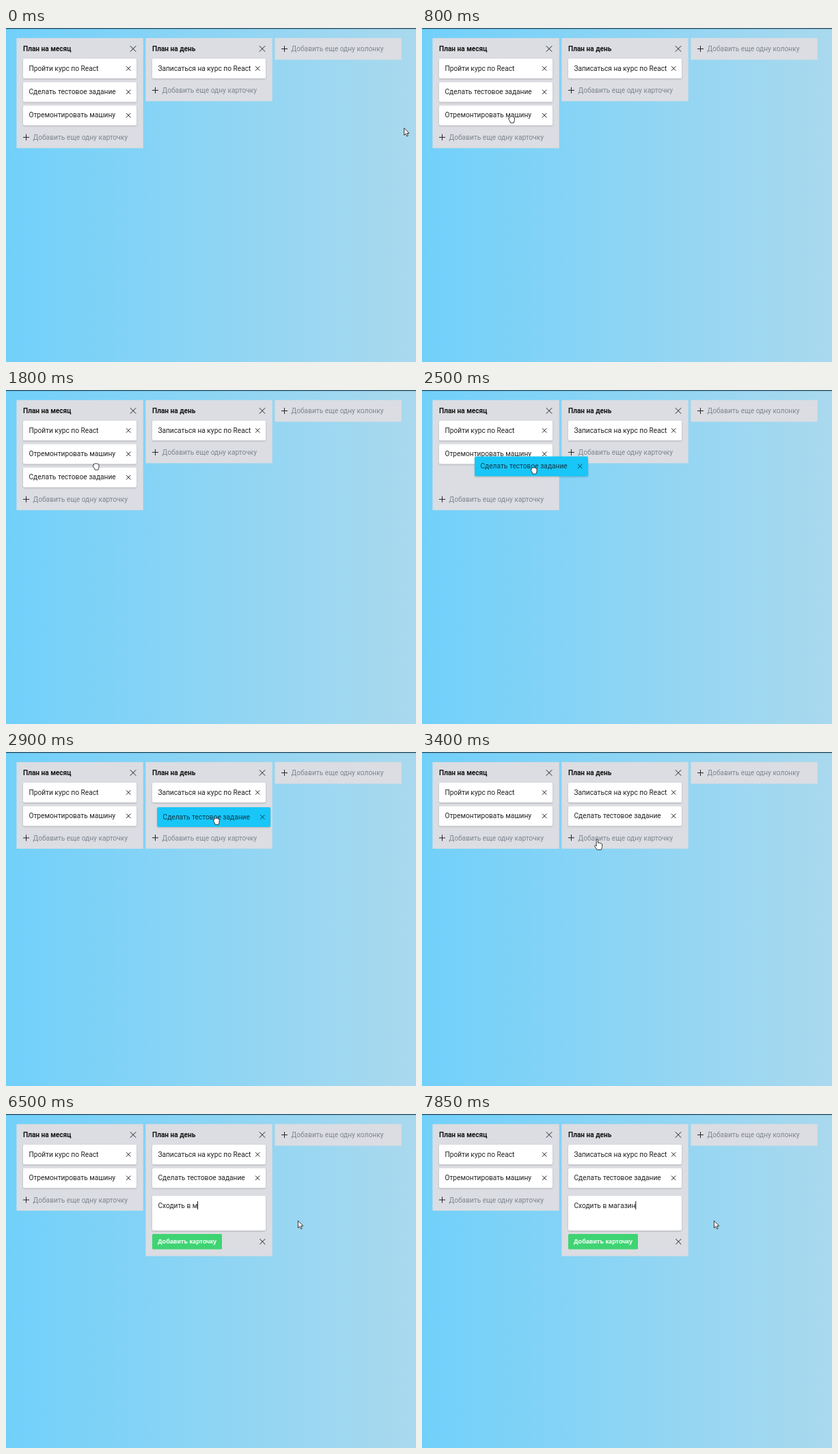
These frames come from a looping animation (600x490 px, 8 s). An HTML page:

```html
<!DOCTYPE html>
<html lang="ru">
<head>
<meta charset="utf-8">
<title>Доска задач</title>
<style>
  html, body { margin: 0; width: 100%; height: 100%; overflow: hidden; }
  body { background: linear-gradient(90deg, #71d0fa, #a9d9ee); }
  svg { display: block; width: 600px; height: 490px; }
  text { font: 10.2px Roboto, "Noto Sans", sans-serif; fill: #222; white-space: pre; }
  .title { font-weight: 700; font-size: 10.1px; fill: #151515; }
  .add text { fill: #7f858e; }
  .hint { fill: #7b7b7b; }
  .submit { font: bold 9.1px "Liberation Sans", Arial, sans-serif; fill: #fff; }
  .bar { fill: #24465a; }
  .column { fill: #dbdde2; }
  .box { fill: #fff; filter: drop-shadow(0 1px 1.2px rgba(0, 0, 0, .2)); }
  .icon { stroke: #222; stroke-width: 1; fill: none; }
  .lifted .box { fill: #18c6f8; }
  .lifted text { fill: #10394c; }
  .lifted .icon { stroke: #10394c; }
  .cursor path { fill: #fff; stroke: #222; stroke-width: .9; stroke-linejoin: round; }
</style>
</head>
<body>
<svg id="stage" viewBox="0 0 600 490"></svg>
<script>
const LOOP = 8000;
const SLOT = [45, 79.4, 113.8];
const STEP = 34.4;
const TOP = 14.8;
const stage = document.getElementById('stage');

function el(tag, attrs, parent = stage, text = '') {
  const node = document.createElementNS('http://www.w3.org/2000/svg', tag);
  for (const key in attrs) node.setAttribute(key, attrs[key]);
  node.textContent = text;
  return parent.appendChild(node);
}
const group = (cls, parent) => el('g', { class: cls }, parent);
const label = (x, y, text, parent, cls = '') => el('text', { x, y, class: cls }, parent, text);
const rect = (x, y, width, height, cls, parent, rx = 0) =>
  el('rect', { x, y, width, height, class: cls, rx }, parent);
const cross = (x, y, r, parent) => el('path', {
  class: 'icon', d: `M${x - r} ${y - r}l${2 * r} ${2 * r}m0 ${-2 * r}l${-2 * r} ${2 * r}`
}, parent);
const plus = (x, y, r, parent) => el('path', {
  class: 'icon', d: `M${x - r} ${y}h${2 * r}M${x} ${y - r}v${2 * r}`
}, parent);
const place = (node, x, y) => node.setAttribute('transform', `translate(${x.toFixed(2)} ${y.toFixed(2)})`);
const show = (node, on) => { node.style.display = on ? '' : 'none'; };

const panel = x => rect(x + .4, TOP, 185.3, 31.8, 'column', stage);

function addButton(text) {
  const g = group('add');
  plus(14.5, 0, 4.5, g);
  label(24.5, 3.7, text, g);
  return g;
}

function column(x, title) {
  const back = panel(x);
  label(x + 10, 34.4, title, stage, 'title');
  cross(x + 171, 30.5, 4.2, stage);
  return { x, back, add: addButton('Добавить еще одну карточку') };
}

function resize(col, bottom, addY) {
  col.back.setAttribute('height', bottom - TOP);
  place(col.add, col.x, addY);
}

function card(text, x, y) {
  const g = group('');
  rect(0, 0, 166, 29, 'box', g, 2);
  label(8.4, 17.7, text, g);
  cross(154.2, 14.4, 3.2, g);
  place(g, x, y);
  return g;
}

rect(0, 0, 600, 1.3, 'bar', stage);
const month = column(15, 'План на месяц');
const day = column(204, 'План на день');
panel(393);
place(addButton('Добавить еще одну колонку'), 393, 30.6);

card('Пройти курс по React', 25, SLOT[0]);
card('Записаться на курс по React', 214, SLOT[0]);
const repair = card('Отремонтировать машину', 25, SLOT[2]);
const task = card('Сделать тестовое задание', 25, SLOT[1]);

const form = group('');
rect(214, 120, 166, 51, 'box', form, 2);
const hint = label(222.4, 137.6, 'Введите название карточки', form, 'hint');
const typed = label(222.4, 137.6, '', form);
const caret = rect(222, 128, .9, 12, '', form);
rect(214, 176, 102, 22.4, '', form, 1.5).setAttribute('fill', '#3fd473');
label(222, 190.4, 'Добавить карточку', form, 'submit');
cross(375.3, 187.3, 4, form);

const cursor = group('cursor');
const shapes = {
  arrow: 'M0 0V10.4L2.4 8.2 4 12 5.8 11.2 4.2 7.6H7.4Z',
  grab: 'M-3.4 1.6L-4.8-.4Q-5-1.8-3.6-1.4V-3.2Q-2.8-4.6-1.8-3.6 -1-5 .2-3.9 1.2-4.7 2.1-3.3 3.6-3.8 4-2.2V1.8L2.8 5.2H-1.8Z',
  point: 'M-1.2.8Q0-.8 1.2.8V5.4L2.9 5.2 4.4 5.8 6 6.2Q7.4 6.4 7.2 8V11.4L5.8 15.4H-.2L-3.4 10.8Q-4.2 9-2.8 8.6L-1.2 10Z'
};
for (const kind in shapes) shapes[kind] = el('path', { d: shapes[kind] }, cursor);

// Pointer stops: time, x, y
const PATH = [
  [0, 582.6, 146.8], [50, 581, 148], [300, 440, 180], [600, 215, 184], [850, 126, 128.1], [950, 126, 128.1],
  [1300, 136, 106.6], [1500, 144, 92], [1600, 144, 92], [1800, 132, 112], [2050, 112, 134.3],
  [2180, 112, 134.3], [2500, 164, 118], [2700, 262, 108], [2950, 311, 101], [3050, 311, 101],
  [3400, 256.4, 128], [3800, 256.4, 128], [4250, 427.4, 156.6], [LOOP, 427.4, 156.6]
];
const GRIP = { repair: [101, 14.3], task: [87, 20.5] };

const slope = (i, k) => (PATH[i + 1][k] - PATH[i][k]) / (PATH[i + 1][0] - PATH[i][0]);
function tangent(i, k) {
  if (!i || i === PATH.length - 1) return 0;
  const a = slope(i - 1, k), b = slope(i, k);
  return a * b > 0 ? 2 * a * b / (a + b) : 0;
}
function pointer(t) {
  const i = PATH.findIndex((p, n) => t < PATH[n + 1][0]);
  const a = PATH[i], b = PATH[i + 1], span = b[0] - a[0], u = (t - a[0]) / span;
  return [1, 2].map(k => {
    const h = u * u * (3 - 2 * u);
    return a[k] + (b[k] - a[k]) * h
      + span * u * (1 - u) * ((1 - u) * tangent(i, k) - u * tangent(i + 1, k));
  });
}

const ease = (t, from, to) => {
  const u = Math.min(1, Math.max(0, (t - from) / (to - from)));
  return u * u * (3 - 2 * u);
};

// Follow the pointer between lift and drop, then glide home.
function drag(node, t, grip, lift, drop, end, rest, home) {
  const active = t >= lift && t < end;
  node.classList.toggle('lifted', active);
  if (t < lift) return place(node, ...rest);
  const hand = pointer(Math.min(t, drop));
  const u = ease(t, drop, end);
  place(node, ...hand.map((v, k) => v - grip[k] + (home[k] - v + grip[k]) * u));
  if (active && node.nextSibling !== form) stage.insertBefore(node, form);
}

const PHRASE = 'Сходить в магазин';
const KEYS = [4650, 4850, 5250, 5500, 5600, 5750, 5900, 6050, 6200, 6350, 6500, 6650, 6750, 6900, 7250, 7450, 7600];
const ruler = document.createElement('canvas').getContext('2d');
ruler.font = '10.2px Roboto, "Noto Sans", sans-serif';

function drawForm(t) {
  const open = t >= 3800;
  show(form, open);
  show(day.add, !open);
  if (!open) return;
  const count = KEYS.filter(k => k <= t).length;
  const text = PHRASE.slice(0, count);
  const last = count ? KEYS[count - 1] : 3870;
  typed.textContent = text;
  show(hint, !count);
  show(caret, (t - last) % 1060 < 530);
  caret.setAttribute('x', 222.2 + ruler.measureText(text).width);
}

function render(t) {
  drag(repair, t, GRIP.repair, 950, 1600, 1720, [25, SLOT[2]], [25, SLOT[1]]);
  drag(task, t, GRIP.task, 2180, 3050, 3300,
    [25, SLOT[1] + STEP * ease(t, 1400, 1580)], [214, SLOT[1]]);

  const moved = STEP * ease(t, 2600, 2800);
  resize(month, 176.3 - moved, 160.4 - moved);
  resize(day, t < 3800 ? 107.4 + moved : 208.5, 91.4 + moved);
  drawForm(t);

  const kind = t < 780 || t >= 3800 ? 'arrow' : t < 3300 ? 'grab' : 'point';
  for (const name in shapes) show(shapes[name], name === kind);
  place(cursor, ...pointer(t));
}

let start;
function tick(now) {
  start ??= now;
  render((now - start) % LOOP);
  requestAnimationFrame(tick);
}
render(0);
requestAnimationFrame(tick);
</script>
</body>
</html>
```
